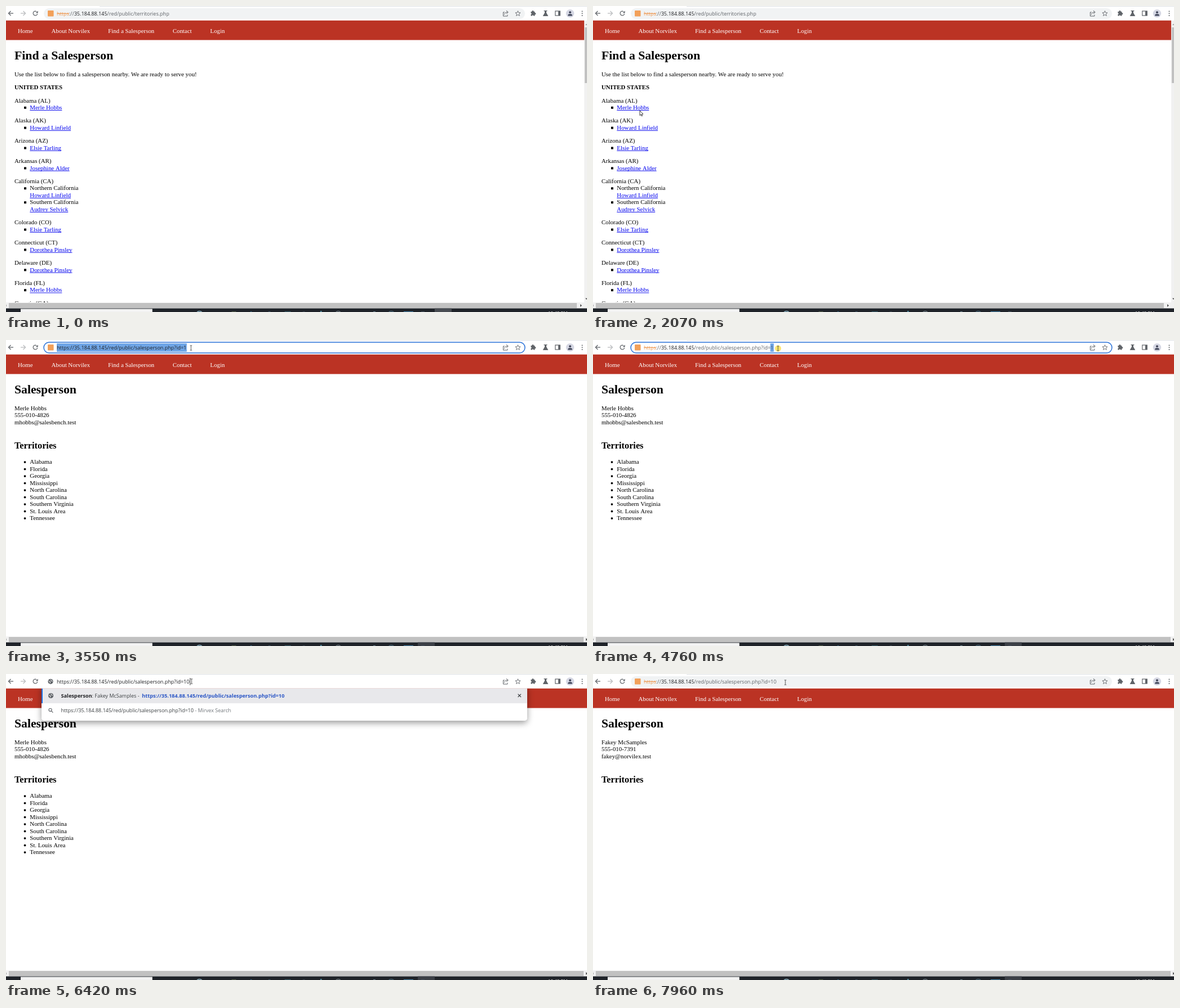
Write an HTML page with a canvas that moves like this. It is 1030 by 544 pixels and loops after 8 s.

```html
<!DOCTYPE html>
<html lang="en">
<head>
<meta charset="utf-8">
<title>Find a Salesperson</title>
<style>
html, body { margin: 0; width: 100%; height: 100%; overflow: hidden; background: #fff; }
canvas { display: block; width: 1030px; height: 544px; }
</style>
</head>
<body>
<canvas id="stage" width="1030" height="544"></canvas>
<script>
const ctx = document.getElementById('stage').getContext('2d');
const LOOP = 8000;
const SERIF = '"Liberation Serif", "Times New Roman", serif';
const SANS = '"Open Sans", "Noto Sans", sans-serif';
const BODY = 10.86, LINE = 12.5;
const HOST = '35.184.88.145', DIR = '/red/public/';
const INK = '#3c4043', GREY = '#5f6368', RED = '#bb3324';

// Cursor path: time, x, y
const PATH = [
  [230, 700, 443], [600, 330, 330], [1000, 94, 208], [1080, 88, 200], [1150, 82, 183],
  [1500, 72, 180], [1860, 80, 182], [2010, 83, 186], [2130, 83, 186], [2200, 80, 181],
  [2460, 78, 181], [2700, 78, 181], [2900, 222, 45], [3070, 311, 27], [3140, 311, 27],
  [3420, 328, 14], [4480, 328, 14], [4760, 328, 15], [5560, 329, 14], [5690, 329, 13],
  [7620, 329, 13], [7760, 335, 9], [7960, 341, 15]
];

const between = (t, a, b) => t >= a && t < b;

function rect(x, y, w, h, color) {
  ctx.fillStyle = color;
  ctx.fillRect(x, y, w, h);
}

function round(x, y, w, h, r) {
  ctx.beginPath();
  ctx.roundRect(x, y, w, h, r);
}

function disc(x, y, r, color) {
  ctx.fillStyle = color;
  ctx.beginPath();
  ctx.arc(x, y, r, 0, Math.PI * 2);
  ctx.fill();
}

function ring(x, y, r, color, width = 1.1, from = 0, to = Math.PI * 2) {
  ctx.strokeStyle = color;
  ctx.lineWidth = width;
  ctx.beginPath();
  ctx.arc(x, y, r, from, to);
  ctx.stroke();
}

function line(color, width, ...pts) {
  ctx.strokeStyle = color;
  ctx.lineWidth = width;
  ctx.beginPath();
  for (let i = 0; i < pts.length; i += 2) ctx.lineTo(pts[i], pts[i + 1]);
  ctx.stroke();
}

function shape(fill, stroke, ...pts) {
  ctx.beginPath();
  for (let i = 0; i < pts.length; i += 2) ctx.lineTo(pts[i], pts[i + 1]);
  ctx.closePath();
  ctx.fillStyle = fill;
  ctx.fill();
  if (stroke) {
    ctx.strokeStyle = stroke;
    ctx.lineWidth = 0.9;
    ctx.stroke();
  }
}

// Draws text and returns where it ends
function text(str, x, y, font, color) {
  ctx.font = font;
  ctx.fillStyle = color;
  ctx.fillText(str, x, y);
  return x + ctx.measureText(str).width;
}

const serif = (str, x, y, size = BODY, weight = 'normal', color = '#000') =>
  text(str, x, y, `${weight} ${size}px ${SERIF}`, color);
const sans = (str, x, y, color, size = 9, weight = 'normal') =>
  text(str, x, y, `${weight} ${size}px ${SANS}`, color);

function link(str, y) {
  const end = serif(str, 42.3, y, BODY, 'normal', '#0000ee');
  rect(42.3, y + 1.1, end - 42.3, 0.9, '#0000ee');
}

function cross(x, y, r, color) {
  line(color, 1.2, x - r, y - r, x + r, y + r);
  line(color, 1.2, x - r, y + r, x + r, y - r);
}

function navBar(width) {
  rect(0, 25.5, width, 35, RED);
  const items = [['Home', 21], ['About Norvilex', 80.5], ['Find a Salesperson', 181],
    ['Contact', 295.5], ['Login', 362]];
  for (const [label, x] of items) serif(label, x, 47.5, BODY, 'normal', '#fff');
}

function listPage() {
  navBar(1025);
  serif('Find a Salesperson', 15, 94.6, 21.72, 'bold');
  serif('Use the list below to find a salesperson nearby. We are ready to serve you!', 15, 124.5);
  serif('UNITED STATES', 15, 148, BODY, 'bold');
  const states = [
    ['Alabama (AL)', 'Merle Hobbs'], ['Alaska (AK)', 'Howard Linfield'],
    ['Arizona (AZ)', 'Elsie Tarling'], ['Arkansas (AR)', 'Josephine Alder'],
    ['California (CA)', 'Howard Linfield', 'Audrey Selvick'],
    ['Colorado (CO)', 'Elsie Tarling'], ['Connecticut (CT)', 'Dorothea Pinsley'],
    ['Delaware (DE)', 'Dorothea Pinsley'], ['Florida (FL)', 'Merle Hobbs'], ['Georgia (GA)']
  ];
  ctx.save();
  ctx.beginPath();
  ctx.rect(0, 60, 1025, 467);
  ctx.clip();
  let y = 171.5;
  for (const [state, ...people] of states) {
    serif(state, 15, y);
    people.forEach((name, i) => {
      y += LINE;
      rect(32, y - 5.2, 4, 4, '#000');
      if (people.length > 1) {
        serif(['Northern', 'Southern'][i] + ' California', 42.3, y);
        y += LINE;
      }
      link(name, y);
    });
    y += 23.36;
  }
  ctx.restore();
}

function personPage(lines, areas) {
  navBar(1030);
  serif('Salesperson', 15, 94.6, 21.72, 'bold');
  lines.forEach((str, i) => serif(str, 15, 124.5 + i * LINE));
  serif('Territories', 15, 193, 16.29, 'bold');
  areas.forEach((area, i) => {
    const y = 220.3 + i * LINE;
    disc(33.5, y - 3.2, 1.9, '#000');
    serif(area, 42.3, y);
  });
}

function scrollBars(vertical) {
  rect(0, 527, 1030, 10.5, '#f1f1f1');
  rect(5, 528, vertical ? 1007 : 1019, 9, '#c1c1c1');
  shape('#a3a3a3', null, 1, 530.5, 1, 534.5, -1, 532.5);
  if (vertical) {
    shape('#505050', null, 1018, 530, 1018, 535, 1021, 532.5);
    rect(1025, 26, 5, 501, '#f1f1f1');
    rect(1026, 38, 4, 99, '#c1c1c1');
    shape('#a3a3a3', null, 1027, 34, 1031, 34, 1029, 31.5);
    shape('#505050', null, 1027, 519.5, 1031, 519.5, 1029, 522);
  } else {
    shape('#505050', null, 1028, 530, 1028, 535, 1031, 532.5);
  }
}

function taskbar(t) {
  rect(0, 537.5, 1030, 6.5, '#1f2329');
  rect(26, 538.5, 233.5, 5.5, '#f3f3f3');
  if (t < 2010) rect(760, 537.5, 30, 6.5, '#484c52');
  else if (t >= 2200) rect(730, 537.5, 30, 6.5, '#3b3f46');
  ring(343, 549, 6.5, '#8fb5c4', 1.4);
  rect(400, 543, 8, 1, '#57624a');
  rect(433, 543, 3, 1, '#35627e');
  rect(465, 543, 4, 1, '#3d5364');
  rect(494, 543, 11, 1, '#3a626f');
  rect(526, 543, 4, 1, '#3a4550');
  rect(557, 542, 3, 2, '#4c7f91');
  ring(589, 548, 5.5, '#87949b');
  rect(651, 543, 4, 1, '#708893');
  ring(683, 549, 6.5, '#54798c');
  rect(705, 543, 17, 1, '#4a8cb5');
  rect(736, 543, 6, 1, '#44515e');
  sans('10:43 PM', 961, 547.5, '#fff', 8);
}

function siteIcon(kind) {
  if (kind === 'secure') {
    round(74, 8, 10.5, 10.5, 1);
    ctx.fillStyle = '#f2a05a';
    ctx.fill();
  } else if (kind === 'info') {
    ring(79, 13.3, 4.2, GREY);
    rect(78.5, 12.6, 1.1, 3.2, GREY);
    rect(78.5, 10.7, 1.1, 1.1, GREY);
  } else {
    globe(79, 13.3);
  }
}

function globe(x, y) {
  disc(x, y, 4.6, GREY);
  line('#e4e4e6', 1.2, x - 3.5, y - 1, x - 0.5, y + 0.5, x - 1, y + 3);
  line('#e4e4e6', 1.2, x, y - 3.5, x + 1.5, y - 1, x + 3.6, y - 0.5);
}

function toolIcons(loading) {
  line(GREY, 1.3, 13, 13, 4.5, 13);
  line(GREY, 1.3, 8.5, 9, 4.5, 13, 8.5, 17);
  line('#babcbe', 1.3, 26, 13, 34.5, 13);
  line('#babcbe', 1.3, 30.5, 9, 34.5, 13, 30.5, 17);
  if (loading) {
    cross(52, 13, 3.6, GREY);
  } else {
    ring(52, 13, 3.8, GREY, 1.3, 0.2, 5.3);
    shape(GREY, null, 56.6, 8.6, 56.6, 12.4, 52.8, 12.4);
  }
  // share
  line(GREY, 1, 884, 11, 881.5, 11, 881.5, 18, 889, 18, 889, 15.5);
  ctx.beginPath();
  ctx.moveTo(883.5, 15.5);
  ctx.quadraticCurveTo(884, 11, 889, 11);
  ctx.stroke();
  line(GREY, 1, 887, 8.2, 890.3, 11, 887, 13.8);
  // star
  const star = [];
  for (let i = 0; i < 10; i++) {
    const a = i * Math.PI / 5 - Math.PI / 2, r = i % 2 ? 2.1 : 4.8;
    star.push(907.5 + r * Math.cos(a), 13.5 + r * Math.sin(a));
  }
  shape('rgba(0,0,0,0)', GREY, ...star);
  // puzzle piece
  rect(930.5, 10, 7, 7.5, GREY);
  disc(934, 9.7, 1.6, GREY);
  disc(937.8, 13.7, 1.6, GREY);
  disc(930.6, 13.7, 1.1, '#fff');
  disc(934, 17.4, 1.1, '#fff');
  // flask
  rect(953.5, 8, 6, 1.2, GREY);
  shape(GREY, null, 955, 9, 958, 9, 958, 12, 961.3, 18, 951.7, 18, 955, 12);
  // side panel
  ctx.strokeStyle = GREY;
  ctx.lineWidth = 1.2;
  ctx.strokeRect(973.8, 9, 8.4, 8);
  rect(979, 9, 3.5, 8, GREY);
  // profile
  disc(1000, 13.3, 7.2, '#d6d8e4');
  disc(1000, 11.3, 2, '#41465a');
  round(996.2, 14.2, 7.6, 3.4, [2.5, 2.5, 0, 0]);
  ctx.fill();
  for (const y of [9.5, 13.2, 16.9]) disc(1021.5, y, 1, GREY);
}

function address(page, style, sel) {
  const y = 16.6;
  let x = 90;
  ctx.font = `9px ${SANS}`;
  const full = 'https://' + HOST + DIR + page;
  if (sel) {
    const end = x + ctx.measureText(full).width;
    const start = sel === 'all' ? x : end - ctx.measureText('1').width - 0.5;
    rect(start, 6, end - start + 0.5, 15, '#6fa5e6');
  }
  if (style === 'edit' || sel === 'all') return sans(full, x, y, '#202124');
  if (style === 'secure') {
    const end = sans('https', x, y, '#ee9a55');
    rect(x, 13, end - x, 0.9, '#ee9a55');
    x = sans('://', end, y, GREY);
  }
  x = sans(HOST, x, y, style === 'secure' ? '#202124' : INK);
  return sans(DIR + page, x, y, GREY);
}

function toolbar(t) {
  rect(0, 0, 1030, 25.5, '#fff');
  rect(166, 0, 864, 1, '#dee1e6');
  const focused = between(t, 3480, 6420), typing = between(t, 6420, 6690);
  if (!typing) {
    round(67, 4, 853, 19, 9.5);
    ctx.fillStyle = focused ? '#fff' : '#f1f3f4';
    ctx.fill();
    if (focused) {
      ctx.strokeStyle = '#2a72d8';
      ctx.lineWidth = 1.5;
      ctx.stroke();
    }
  }
  const style = typing ? 'edit' : between(t, 6690, 7020) ? 'info' : 'secure';
  const page = t < 2730 ? 'territories.php' : 'salesperson.php?id=' + (t < 6420 ? 1 : 10);
  const sel = between(t, 3480, 3880) || between(t, 4410, 4760) ? 'all'
    : between(t, 4760, 6150) ? 'last' : '';
  siteIcon(style);
  const end = address(page, style, sel);
  if (between(t, 6150, 6690)) rect(end + 0.7, 7, 0.8, 13, '#202124');
  toolIcons(between(t, 2530, 2860) || between(t, 6690, 7220));
}

function suggestions(t) {
  if (!between(t, 6420, 6760)) return;
  const url = 'https://' + HOST + DIR + 'salesperson.php?id=10';
  const panel = () => ctx.roundRect(63, 20, 861, 63, [0, 0, 5, 5]);
  const fading = t >= 6690;
  ctx.save();
  ctx.beginPath();
  ctx.rect(0, 25.5, 1030, 90);
  ctx.clip();
  ctx.globalAlpha = fading ? 0.83 : 1;
  // shadow only outside, so the panel stays translucent
  ctx.save();
  ctx.beginPath();
  ctx.rect(40, 0, 910, 120);
  panel();
  ctx.clip('evenodd');
  ctx.shadowColor = 'rgba(0,0,0,.4)';
  ctx.shadowBlur = 12;
  ctx.shadowOffsetY = 4;
  ctx.fillStyle = '#fff';
  ctx.beginPath();
  panel();
  ctx.fill();
  ctx.restore();
  ctx.save();
  ctx.beginPath();
  panel();
  ctx.clip();
  rect(63, 25, 861, 27, '#e8e8eb');
  rect(63, 52, 861, 31, '#fff');
  ctx.restore();
  rect(63, 26, 2, 26, '#1a73e8');
  ctx.globalAlpha = fading ? 0.92 : 1;
  globe(79.5, 38.5);
  let x = sans('Salesperson', 97.5, 41.7, '#202124', 9.18, 'bold');
  sans(': Fakey McSamples - ', x, 41.7, INK);
  sans(url, 241, 41.7, '#2a56c6', 9.18, 'bold');
  cross(910.3, 38.3, 2.7, INK);
  ring(78.5, 63.8, 2.6, GREY);
  line(GREY, 1.2, 80.4, 65.7, 83.3, 68.6);
  x = sans(url, 97.5, 68, INK);
  sans(' - Mirvex Search', x, 68, '#70757a');
  ctx.restore();
}

function hoverPage(t) {
  if (between(t, 1150, 1930) || between(t, 2200, 2730)) return 'salesperson.php?id=1';
  if (between(t, 2860, 3520)) return 'territories.php';
  return '';
}

function statusBubble(t) {
  const page = hoverPage(t);
  if (!page) return;
  const str = 'https://' + HOST + DIR + page;
  ctx.font = `7.7px ${SANS}`;
  const w = ctx.measureText(str).width;
  round(-5, 523, w + 5, 15, [0, 3, 0, 0]);
  ctx.fillStyle = '#dee1e6';
  ctx.fill();
  ctx.strokeStyle = '#c3c6ca';
  ctx.lineWidth = 0.8;
  ctx.stroke();
  sans(str, -4.3, 533.3, GREY, 7.7);
}

function position(t) {
  const i = PATH.findIndex(p => p[0] > t);
  if (i < 0) return PATH[PATH.length - 1].slice(1);
  const [t0, x0, y0] = PATH[i - 1], [t1, x1, y1] = PATH[i];
  const k = (t - t0) / (t1 - t0), e = k * k * (3 - 2 * k);
  return [x0 + (x1 - x0) * e, y0 + (y1 - y0) * e];
}

function cursor(t) {
  if (t < PATH[0][0]) return;
  const [x, y] = position(t);
  const pressed = [[2330, 2460], [3480, 3550], [3880, 4010], [4410, 4480], [4760, 5500]];
  if (pressed.some(([a, b]) => between(t, a, b))) disc(x, y, 5.5, 'rgba(255,222,60,.75)');
  ctx.save();
  ctx.translate(x, y);
  if (y < 24) {
    line('#444', 0.9, 0, -4, 0, 4);
    line('#444', 0.8, -1.8, -4.2, 1.8, -4.2);
    line('#444', 0.8, -1.8, 4.2, 1.8, 4.2);
  } else if (hoverPage(t).includes('id')) {
    shape('#fff', '#222', 0, 0, 1.3, 0, 1.5, 3.6, 5.5, 4.5, 5.5, 7.5, 4.5, 10, 0, 10, -2.8, 6, -2, 5.2, -0.2, 6.5);
  } else {
    shape('#fff', '#222', 0, 0, 0, 8.6, 2, 6.8, 3.3, 9.8, 4.6, 9.2, 3.3, 6.3, 5.9, 6.1);
  }
  ctx.restore();
}

function draw(t) {
  rect(0, 0, 1030, 544, '#fff');
  const onList = t < 2730;
  if (onList) {
    listPage();
  } else if (t < 7090) {
    personPage(['Merle Hobbs', '555-010-4826', 'mhobbs@salesbench.test'],
      ['Alabama', 'Florida', 'Georgia', 'Mississippi', 'North Carolina', 'South Carolina',
        'Southern Virginia', 'St. Louis Area', 'Tennessee']);
  } else {
    personPage(['Fakey McSamples', '555-010-7391', 'fakey@norvilex.test'], []);
  }
  scrollBars(onList);
  statusBubble(t);
  taskbar(t);
  toolbar(t);
  suggestions(t);
  cursor(t);
}

function tick(now) {
  draw(now % LOOP);
  requestAnimationFrame(tick);
}
requestAnimationFrame(tick);
</script>
</body>
</html>
```
